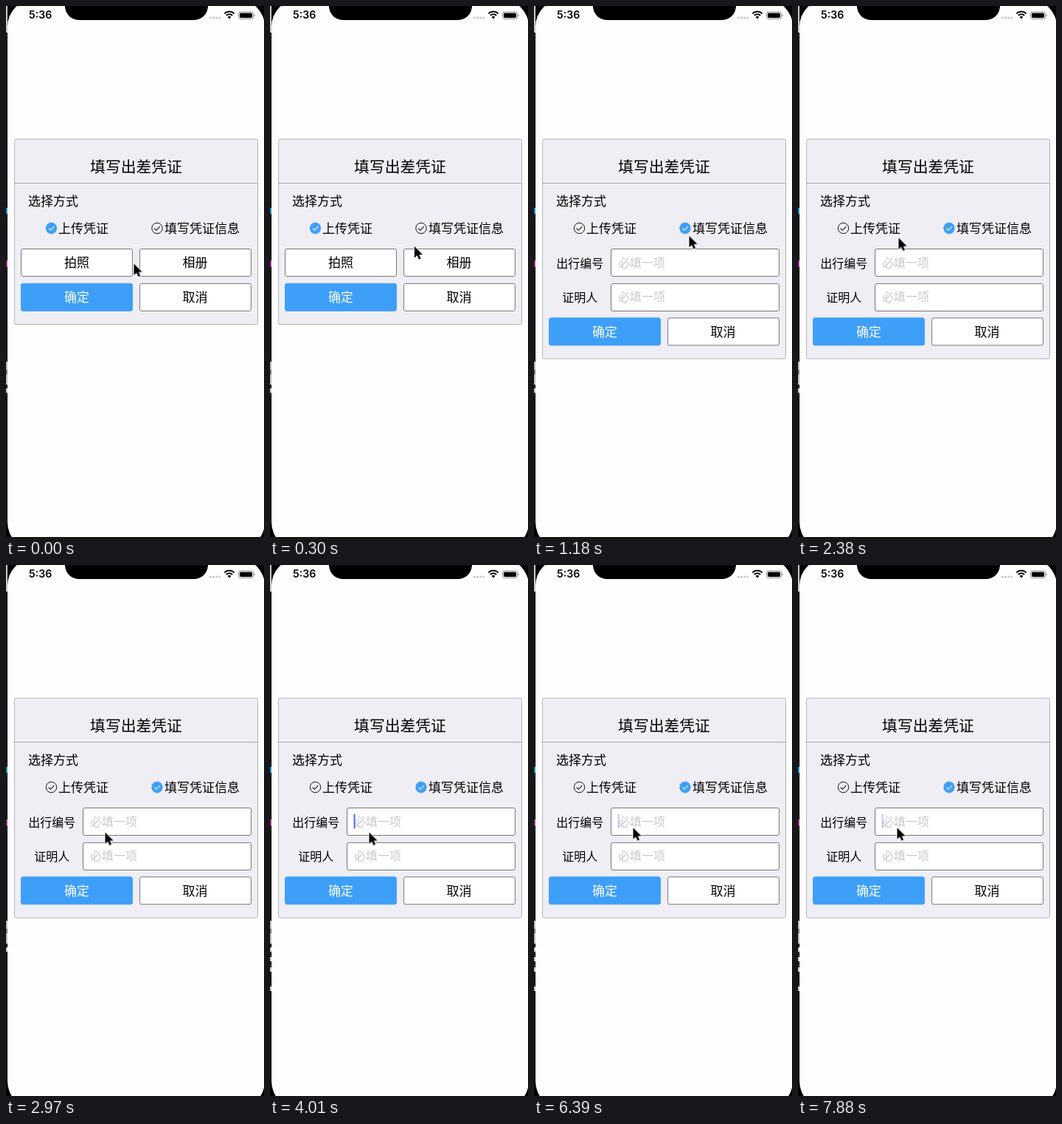
An HTML page for the animation above (8000 ms loop, 350x718 px).

```html
<!DOCTYPE html>
<html lang="zh-CN">
<head>
<meta charset="utf-8">
<title>填写出差凭证</title>
<style>
html, body { margin: 0; width: 100%; height: 100%; overflow: hidden; background: #000; }
svg { display: block; width: 350px; height: 718px; }
text { font: 17px "Noto Sans CJK SC", "Noto Sans CJK", "Noto Sans", sans-serif; fill: #000; }
.mid { text-anchor: middle; }
.title { font-size: 20.8px; }
.label { font-size: 16px; }
.hint { font-size: 16px; fill: #c9c9cf; }
.clock { font: 600 14.2px Inter, sans-serif; }
.card { fill: #efeef4; stroke: #b2b2b7; }
.box { fill: #fff; stroke: #77777b; }
.blue { fill: #3e9ff8; }
.light { fill: #fff; }

.upload, .form, .foot, .press, .caret, .log, .cursor {
  animation: 8s step-end infinite;
}
.upload { animation-name: upload; }
.form { animation-name: form; }
.foot { animation-name: foot; }
.press { animation-name: press; }
.caret { animation-name: caret; }
.log { animation-name: log; }
.cursor { animation-name: cursor; }

@keyframes upload { 0% { visibility: visible } 14.75%, 100% { visibility: hidden } }
@keyframes form { 0% { visibility: hidden } 14.75%, 100% { visibility: visible } }
@keyframes foot { 0% { transform: none } 14.75%, 100% { transform: translate(0, 46.5px) } }
@keyframes press { 0% { color: #111 } 11.125%, 100% { color: #78b9f5 } }
@keyframes log { 0% { opacity: 0 } 42.625%, 100% { opacity: 1 } }
@keyframes caret {
  0%, 57.5%, 70.625%, 81.75%, 94.75% { opacity: 0 }
  50.125%, 63.125%, 76.125%, 87.25% { opacity: 1 }
  55.75%, 61.25%, 68.75%, 74.375%, 79.875%, 92.875%, 98.5%, 100% { opacity: .38 }
}
@keyframes cursor {
  0% { transform: translate(173.5px, 348.5px) }
  1.875% { transform: translate(181px, 341px) }
  3.75% { transform: translate(196px, 325px) }
  5.5% { transform: translate(207px, 314px) }
  7.375% { transform: translate(210.5px, 310.8px) }
  26% { transform: translate(188px, 311px) }
  27.875% { transform: translate(152px, 312px) }
  29.75% { transform: translate(136.5px, 313.5px) }
  31.625% { transform: translate(131px, 326px) }
  33.5% { transform: translate(129px, 343px) }
  35.25% { transform: translate(132px, 356px) }
  37.125% { transform: translate(134.5px, 361.5px) }
  52% { transform: translate(134.5px, 360px) }
  53.875% { transform: translate(134.5px, 357px) }
  55.75%, 100% { transform: translate(134.5px, 355.2px) }
}
</style>
</head>
<body>
<svg viewBox="0 0 350 718">
  <defs>
    <path id="tick" d="M-3.7 .2 L-1.1 2.8 L3.9 -2.4" fill="none"/>
    <g id="on">
      <circle r="7.7" class="blue"/>
      <use href="#tick" stroke="#fff" stroke-width="1.1"/>
    </g>
    <g id="off" fill="none" stroke="currentColor">
      <circle r="7.2"/>
      <use href="#tick" stroke-width="1.1"/>
    </g>
    <rect id="half" width="151" height="37" rx="2.5"/>
    <rect id="field" x="104.5" width="228" height="37" rx="2.5"/>
  </defs>

  <rect width="350" height="718"/>
  <!-- sliver of the window behind the phone -->
  <g>
    <rect width="2" height="36" fill="#c8c8c8"/>
    <rect y="273" width="2" height="8" fill="#1c9bd0"/>
    <rect y="344" width="2" height="9" fill="#a63a96"/>
    <rect y="481" width="2" height="31" fill="#bdbdbd"/>
    <rect y="492" width="2" height="6" fill="#777"/>
    <rect y="517" width="2" height="6" fill="#ccc"/>
    <path class="log" d="M0 530h2v6h-2z M0 544h2v6h-2z M0 570h2v6h-2z" fill="#ccc"/>
  </g>

  <!-- phone screen -->
  <rect x="2" y="-9" width="349" height="744" rx="37" fill="#fefefe"/>
  <path d="M79 -1 Q80 0 80 1 C81 12 89 19 100 19 H254 C265 19 273 12 274 1 Q274 0 275 -1 Z"/>
  <text class="clock" x="31" y="17.2">5:36</text>
  <g fill="#c9c9c9">
    <circle cx="277.2" cy="16" r="1.6"/>
    <circle cx="281.4" cy="16" r="1.6"/>
    <circle cx="285.6" cy="16" r="1.6"/>
    <circle cx="289.8" cy="16" r="1.6"/>
  </g>
  <path d="M303 17.4 l-2.4 -2.6 a3.5 3.5 0 0 1 4.8 0z"/>
  <path d="M298.8 12.8 a6.2 6.2 0 0 1 8.4 0 M296.4 10.2 a9.7 9.7 0 0 1 13.2 0" fill="none" stroke="#000" stroke-width="2"/>
  <rect x="315.5" y="8" width="20" height="9.4" rx="2.6" fill="none" stroke="#8c8c8c"/>
  <rect x="317" y="9.5" width="17" height="6.4" rx="1.4"/>
  <path d="M336.6 11.2 q1.4 .4 1.4 1.5 t-1.4 1.5z" fill="#8c8c8c"/>

  <!-- dialog -->
  <rect class="card upload" x="11.5" y="180" width="330" height="250.5" rx="2.5"/>
  <rect class="card form" x="11.5" y="180" width="330" height="297" rx="2.5"/>
  <path d="M12 239.5H341" stroke="#a6a6ab"/>
  <text class="title mid" x="176.5" y="224.6">填写出差凭证</text>
  <text x="30" y="269.6">选择方式</text>
  <text x="71" y="306.7">上传凭证</text>
  <text x="215" y="306.7">填写凭证信息</text>

  <g class="upload">
    <use href="#on" x="61.5" y="300.5"/>
    <use href="#off" class="press" x="205" y="300.5"/>
    <use href="#half" class="box" x="20.5" y="328.5"/>
    <use href="#half" class="box" x="181.5" y="328.5"/>
    <text class="mid" x="96" y="353.4">拍照</text>
    <text class="mid" x="256.5" y="353.4">相册</text>
  </g>

  <g class="form">
    <use href="#off" x="61.5" y="300.5" color="#111"/>
    <use href="#on" x="205" y="300.5"/>
    <use href="#field" class="box" y="328.5"/>
    <use href="#field" class="box" y="375.5"/>
    <text class="label" x="30.3" y="353.6">出行编号</text>
    <text class="label" x="38.3" y="400.2">证明人</text>
    <text class="hint" x="114" y="352.7">必填一项</text>
    <text class="hint" x="114" y="399.3">必填一项</text>
  </g>

  <g class="foot">
    <use href="#half" class="blue" stroke="#3e9ff8" x="20.5" y="375.3"/>
    <use href="#half" class="box" x="181.5" y="375.3"/>
    <text class="mid light" x="96" y="400">确定</text>
    <text class="mid" x="256.5" y="400">取消</text>
  </g>

  <rect class="caret" x="113.6" y="336.4" width="2" height="20" rx="1" fill="#4a6cf0"/>
  <g class="cursor">
    <path d="M0 0V15.6L3.6 12.3L6 17.6L8.6 16.5L6.3 11.2H11.2Z" fill="#000" stroke="#fff" stroke-width="1.6" stroke-linejoin="round" paint-order="stroke"/>
  </g>
</svg>
</body>
</html>
```
